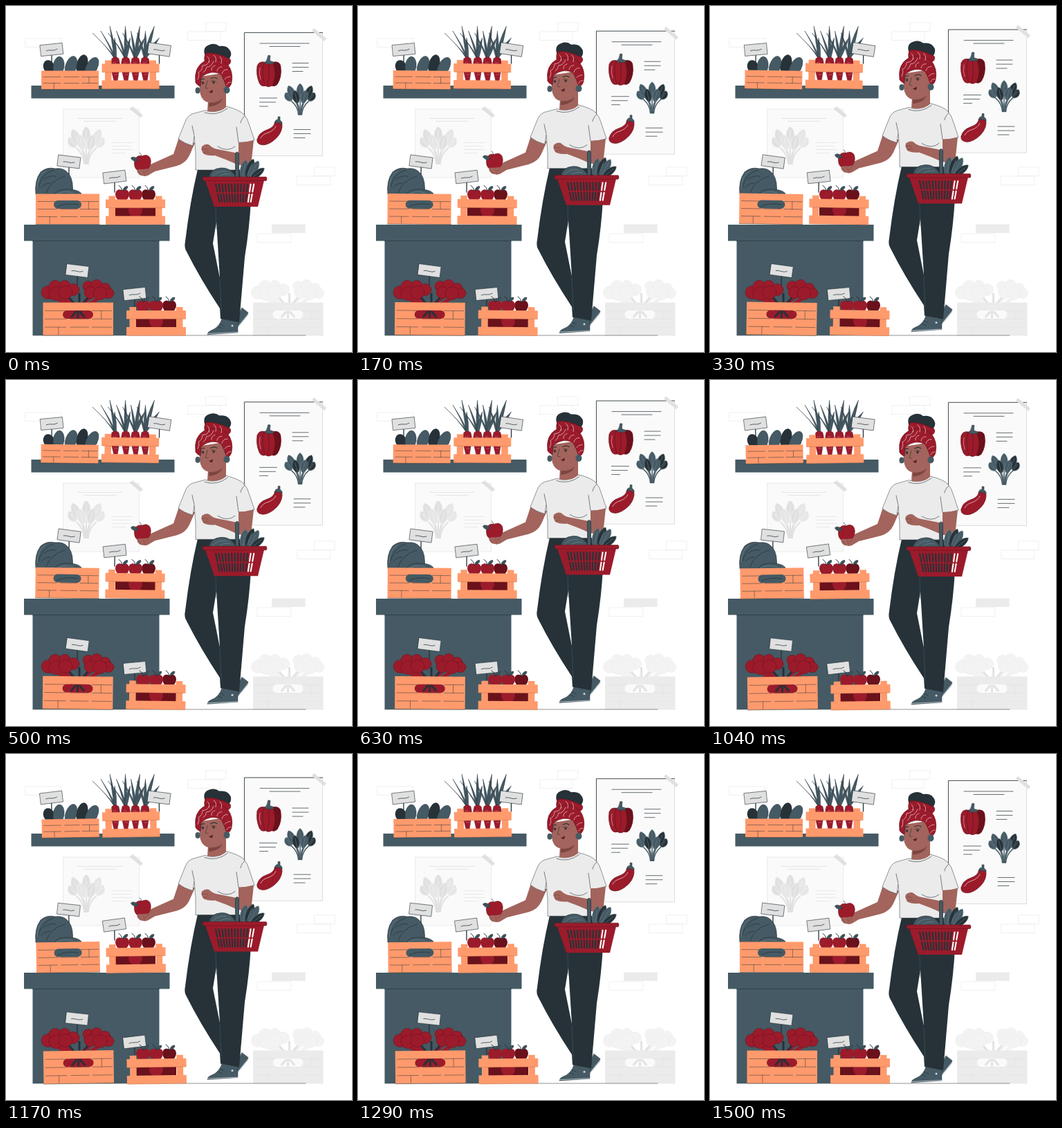
An HTML page for the animation above (1.54 s loop, 500 by 500 pixels).

```html
<!DOCTYPE html>
<html lang="en">
<head>
<meta charset="utf-8">
<title>Vegetable stall</title>
<style>
  html, body { margin: 0; height: 100%; overflow: hidden; background: #fff; }
  svg { display: block; width: 100%; height: 100%; stroke-linecap: round; stroke-linejoin: round; }
</style>
</head>
<body>
<svg id="stage" viewBox="0 0 500 500"></svg>
<script>
const DARK = '#263238', TEAL = '#455a64', RED = '#9b1b2b', WINE = '#6a111b',
      ORANGE = '#ff9a6c', SKIN = '#a2645c', SHADE = '#7d4640', PALE = '#ebebeb', SIGN = '#e0e0e0',
      PAPER = '#fafafa', MIST = '#71868f';

// Shape helpers
const path = (d, fill, stroke = 'none', w = .7) =>
  `<path d="${d}" fill="${fill}" stroke="${stroke}" stroke-width="${w}"/>`;
const line = (d, stroke = DARK, w = .7) => path(d, 'none', stroke, w);
const rect = (x, y, w, h, fill, stroke, sw) => path(`M${x} ${y}h${w}v${h}h${-w}z`, fill, stroke, sw);
const pill = (x, y, w, h, fill) => `<rect x="${x}" y="${y}" width="${w}" height="${h}" rx="${h / 2}" fill="${fill}"/>`;
const oval = (x, y, rx, ry, fill, turn = 0, stroke = 'none') =>
  `<ellipse cx="${x}" cy="${y}" rx="${rx}" ry="${ry}" fill="${fill}" stroke="${stroke}" stroke-width=".5" transform="rotate(${turn} ${x} ${y})"/>`;
const at = (x, y, body, extra = '') => `<g transform="translate(${x} ${y}) ${extra}">${body}</g>`;
const sway = (x, y, body) => `<g class="sway" data-pivot="${x} ${y}">${body}</g>`;
const lines = (x, y, step, widths, color) =>
  widths.map((w, i) => line(`M${x} ${y + i * step}h${w}`, color)).join('');

const leaf = (x, y, len, w, turn, fill, vein) => at(x, y,
  path(`M0 0C${-w} ${-len * .3} ${-w * .8} ${-len * .85} 0 ${-len}C${w * .8} ${-len * .85} ${w} ${-len * .3} 0 0`, fill, vein, .5) +
  line(`M0 0V${-len * .8}`, vein, .5), `rotate(${turn})`);

const bunch = (x, y, scale, fills, vein) => at(x, y,
  [[-36, 23, 15], [36, 23, 15], [-23, 22, 23], [23, 22, 23], [0, 21, 24], [-14, 16, 20], [14, 16, 20]].map(([turn, stem, len], i) => {
    const a = turn * .9 * Math.PI / 180, sx = Math.sin(a) * stem, sy = -Math.cos(a) * stem;
    return line(`M${sx * .2} 0Q${sx * .25} ${sy * .6} ${sx} ${sy}`, fills[0], 1.5) +
      leaf(sx, sy, len, 7.5, turn, fills[i % fills.length], vein);
  }).join(''), `scale(${scale})`);

// Stall pieces
const sign = (x, y, turn, stick) => sway(x, y + stick,
  line(`M${x} ${y + 6}V${y + stick}`, DARK, 1.3) +
  at(x, y, rect(-16, -8, 32, 16, SIGN, DARK, .6) + line('M-8 1q4 -1 8 0t8 -1'), `rotate(${turn})`));

const swayCrate = (x, y, w, h, body) => sway(x + w / 2 + 20, y + h / 2 - 45, body);

const plankCrate = (x, y, w, h, rows = 4, fill = ORANGE, ink = DARK) => {
  const step = h / rows;
  let s = rect(x, y, w, h, fill);
  for (let i = 1; i < rows; i++)
    s += line(`M${x + 3} ${y + step * i}h${w * .3}m${w * .06} 0h${w * .26}m${w * .05} 0h${w * .28}`, ink, .5);
  return s + line(`M${x + w * .83} ${y + step}v${step}M${x + w * .22} ${y + step * (rows - 1)}v${step * .9}M${x} ${y + h}h${w}`, ink, .5);
};

const slatCrate = (x, y, w) => swayCrate(x, y, w, 37,
  rect(x + 4.5, y - 5, 9.5, 41, ORANGE) + rect(x + w - 14, y - 5, 9.5, 41, ORANGE) +
  [0, 24].map(dy => rect(x, y + dy, w, 12.3, ORANGE) +
    line(`M${x + 1} ${y + dy + 12.3}h${w - 2}`, '#b3674a', .4)).join(''));

const apple = (x, y, fill, top = true) =>
  path(`M${x} ${y - 7}c4 -3 10 -1 10 6c-1 7 -6 11 -10 9c-4 2 -9 -2 -10 -9c0 -7 6 -9 10 -6z`, fill) +
  (top ? line(`M${x} ${y - 6}q-1 -6 -5 -8`, DARK, 1) + leaf(x + 1, y - 7, 9, 3, 50, TEAL, DARK) : '');

const appleCrate = (x, y) =>
  rect(x + 14, y + 4, 58, 22, WINE) +
  [[62, WINE], [43, RED], [24, RED]].map(([dx, c]) => apple(x + dx, y - 6, c)).join('') +
  [[24, WINE], [62, WINE], [43, RED]].map(([dx, c]) => apple(x + dx, y + 17, c, false)).join('') +
  slatCrate(x, y, 86);

const florets = [[61, 414, 10], [71, 405, 9], [85, 404, 8], [97, 410, 9], [72, 416, 10], [86, 414, 10],
                 [119, 405, 8], [131, 403, 8], [143, 408, 8], [148, 415, 8], [122, 414, 9], [136, 415, 10]];
const floretCrate = ({ fill, stem, edge, wood, ink, hole, wrap }) =>
  line('M82 420l16 14M72 420l18 14M124 418l-16 16M136 420l-18 14', fill, 6) +
  line('M90 420l12 14M121 418l-13 16M106 416v16', stem, 3) +
  florets.map(([x, y, r]) => oval(x, y, r, r * .95, fill, 0, edge)).join('') +
  wrap(plankCrate(53.5, 428.5, 101.5, 47.5, 4, wood, ink) + pill(82, 440, 44, 12, hole) +
    line('M95 449l6 -7M104 450v-8M113 449l-6 -7', stem, 3));

const radish = x =>
  [[-23, 37], [-11, 40], [2, 47], [9, 30]].map(([spread, h]) => {
    const dx = spread + (x - 178) * .5;
    return path(`M${x - 1.5} 76Q${x + dx * .3 - 3} ${76 - h * .5} ${x + dx} ${76 - h}Q${x + dx * .5 + 3} ${76 - h * .5} ${x + 1.5} 76z`, TEAL, DARK, .4);
  }).join('') +
  path(`M${x - 5} 76q5 -5 10 0q3 9 0 20l-2 13h-5l-3 -13q-3 -11 0 -20z`, RED, WINE, .4) +
  line(`M${x - 3} 82h4M${x - 1} 99h4`, '#d58a90', .5);

const brick = (x, y, w) => rect(x, y, w, 12.5, 'none', '#e6e6e6', .6);

const backdrop =
  [[28, 47, 52], [289, 24, 29], [263, 37, 47], [446, 233, 29], [421, 246, 48], [363.5, 329, 48.5]].map(b => brick(...b)).join('') +
  rect(384, 315.5, 48.5, 12.5, PALE) +
  rect(83, 149, 109.5, 99, PAPER, PALE, 1) +
  lines(104, 162.5, 0, [64], '#dcdcdc') + lines(113, 166.5, 0, [46], '#dcdcdc') +
  lines(153, 197.5, 5, [30, 27, 30, 20], '#e2e2e2') +
  bunch(116, 228, 1.2, ['#e0e0e0', '#e6e6e6'], '#f5f5f5') +
  path('M183 145l15 13l-3.5 3.5l-16 -13z', SIGN) +
  at(303.5, 0, floretCrate({ fill: '#f3f3f3', stem: '#e3e3e3', edge: '#ebebeb', wood: PALE, ink: '#dcdcdc', hole: '#fafafa', wrap: s => s })) +
  line('M39 476H433', '#777', .8);

const stall =
  rect(36.5, 115, 207, 18.5, TEAL) +
  rect(38.5, 339, 183, 137, TEAL) + rect(26, 316, 210.5, 23.5, TEAL) + line('M38.5 339.5h183', DARK, .6) +
  sign(66, 63, -6, 22) +
  oval(62, 88, 8, 10, DARK, -20) + oval(76, 87, 8, 14, TEAL, 8, DARK) +
  oval(110, 85, 8, 15, DARK, 14) + oval(94, 87, 8, 15, TEAL, 18, DARK) + oval(124, 88, 8, 15, TEAL, 28, DARK) +
  swayCrate(51, 93, 83, 27, plankCrate(51, 93.5, 83, 27, 3)) +
  [158, 173, 187, 201].map(radish).join('') + sign(221.5, 63, 8, 20) + slatCrate(138.5, 83.5, 83) +
  sign(91, 225, 7, 24) +
  path('M43 272q-2 -20 7 -32q9 -8 21 -5q13 -2 20 8q7 9 5 29z', TEAL, DARK) +
  line('M47 262q4 -20 22 -25M58 270q6 -18 27 -24M72 246q-8 -2 -17 4M64 256q-8 0 -13 6', DARK) +
  line('M45 264q1 -20 12 -25', MIST) +
  path('M68 276q4 -11 17 -11q18 -1 24 6l-5 6z', TEAL, DARK) + line('M73 272q10 -6 24 -2', MIST) +
  swayCrate(43, 271, 92, 44, plankCrate(43, 271.5, 92, 44) + pill(69, 281, 40, 12, TEAL) + line('M74 290q12 -6 30 -3')) +
  sign(157, 247, -7, 22) + appleCrate(144, 279.5) +
  sign(103, 382.5, 7, 23) +
  floretCrate({ fill: RED, stem: DARK, edge: WINE, wood: ORANGE, ink: DARK, hole: RED, wrap: s => swayCrate(53, 428, 102, 48, s) }) +
  sign(186, 416, -6, 18) + appleCrate(174, 440);

const pepper =
  path('M363 86q2 -8 11 -6q6 -3 12 0q10 -2 11 7q2 14 -5 25q-4 4 -8 2q-5 3 -9 0q-6 2 -9 -4q-5 -12 -3 -24z', RED, WINE) +
  path('M385 80q11 -2 12 7q1 15 -5 25q-4 4 -7 1q7 -16 0 -33z', WINE) +
  line('M373 81q-5 14 1 32M379 82q3 16 -1 32', WINE) + line('M367 88q-2 9 1 17', '#e7a4a8') +
  path('M373 81q4 -2 5 -8q0 -2 1 -3l3 .5q-1 6 0 8q4 0 6 3q-8 3 -15 -.5z', TEAL, DARK, .5);

const poster =
  rect(344.5, 38.5, 113, 178, PAPER, '#c8c8c8', .6) + line('M344.5 216V38.5H457.5', DARK, .8) +
  line('M367 54h71M381 58.5h44') +
  lines(414, 82.5, 6, [23, 23, 15]) + lines(366.5, 133, 6, [25, 23, 12]) + lines(416, 178.5, 6, [24, 24, 16]) +
  at(0, 1.2, pepper) +
  bunch(425, 157, 1, [TEAL, DARK], MIST) +
  path('M363 193q2 -10 14 -14q9 -3 11 -9q1 -5 6 -5q5 2 5 9q-1 12 -13 21q-11 8 -19 5q-5 -2 -4 -7z', RED, WINE) +
  line('M368 191q3 -6 11 -8q8 -3 11 -9', '#e7a4a8', 1) +
  path('M388 169q1 -5 5 -5l0 -4h3l0 5q4 2 3 6q-3 -3 -5 -2q-3 -2 -6 0z', TEAL, DARK, .5) +
  path('M445 32l18 15l-3 4l-18 -15z', SIGN);

let slots = '';
for (let i = 0; i < 13; i++) {
  const x = 303 + i * 4.6, lean = (333 - x) * .1, fill = x > 350 ? '#fff' : DARK;
  slots += line(`M${x} 257.5l${lean * .8} 11M${x + lean} 272l${lean * .8} 11`, fill, 2.1);
}

const legs =
  path('M341 436l9 7l-1 4l-18 22l-6 -4z', TEAL, DARK, .4) + line('M350 445l-16 20', '#cfd8dc', 1) +
  path('M312 452l23 4v16l-44 3q0 -4 5 -6q12 -4 16 -17z', TEAL, DARK, .4) +
  line('M291.5 473.5l43 -2', '#cfd8dc', .8) + line('M306 463l6 3M309 459l6 3') + oval(327, 462, 1.5, 1.5, '#cfd8dc') +
  path('M277 236h60q14 17 17 44q-2 40 -9 83l-8 94l-27 -5l-1 -15q-29 -44 -48 -82q-4 -6 -2 -15q7 -58 18 -104z', DARK) +
  path('M304 312l-5 31l10 50z', '#fff') + line('M303 292l1 30M309 395l2 46', TEAL, .6);

const head =
  path('M305 126l13 -8v28q-9 9 -27 6l1 -16z', SKIN) + path('M293 139.5q14 1 20 -6q-3 10 -20 12z', SHADE) +
  path('M281 102q-3 15 0 26q3 10 12 11.5q10 1 18 -5l7 -16l-2 -22z', SKIN) +
  path('M287 70q-3 -11 7 -14q8 -3 14 2q10 -1 14 4q6 6 1 14l-23 8z', DARK) +
  path('M289 68q14 -2 35 9q3 6 -6 10l-30 -5q-3 -8 1 -14z', RED, WINE) +
  path('M274 110q-3 -22 14 -31q18 -7 32 5q9 11 6 27q-2 7 -7 8q-3 -11 -8 -20q-14 -8 -29 4l-1 13q-6 -2 -7 -6z', RED, WINE) +
  line('M277 106q3 -6 1 -10q6 -3 6 -10q7 0 10 -6M285 96q4 -2 5 -8q6 1 10 -8M297 93q-1 -5 5 -7M305 94q1 -6 7 -6M312 98q2 -7 8 -6M316 106q3 -4 8 -4M319 114q1 -4 6 -4M291 73q4 3 2 8M300 71q5 3 3 10M309 73q4 4 2 10', '#f0d4d4', .7) +
  oval(277, 122, 3.5, 4.5, TEAL) + oval(319, 121.5, 4.5, 5, TEAL) +
  line('M281.5 106.5q2 -2 5 -1M296 105q5 -3 9 0', DARK, 1.2) +
  oval(284.5, 111.5, 1.4, 1.8, DARK) + oval(300, 110.5, 1.5, 1.8, DARK) +
  line('M281.5 109.5q3 -1 5 1M296.5 108.5q4 -2 7 1M291 108q-1 6 -3 10q2 2 4 1', DARK, .6) +
  path('M293 123.5q3 0 5.500 -2.5q1 4 -2 5z', '#4b2027');

const shopper = legs +
  path('M250 190l-8 24l-29 13q-9 4 -14 8l-9 1q-2 4 3 8q6 3 12 1l10 -6l32 -8q13 -4 18 -15l8 -18z', SKIN) +
  path('M196 217q8 -4 12 2q3 7 -1 14q-5 7 -11 5q-8 1 -10 -6q-2 -9 2 -13q4 -4 8 -2z', RED, WINE, .5) +
  line('M196 218q0 -4 -3 -6') + leaf(191, 223, 11, 4, -72, TEAL, DARK) +
  path('M189 237q4 -2 8 -1l9 -1q8 0 8 4l-9 5q-3 3 -6 1l-5 -1z', SKIN) + line('M192 239l3 6M199 238l1 6M206 236l-4 5', SHADE, .6) +
  path('M288 151q15 6 30 -6q20 5 26 12q5 5 8 16l7 21q-10 4 -22 4l-1 39h-62q1 -23 -2 -49l-2 14q-12 -3 -21 -10l10 -25q3 -8 10 -11z', PALE, DARK, .5) +
  line('M287 154q17 6 33 -6M339 169q1 -6 6 -10M336 197l-3 -22M272 187l-3 -14M306 203q14 9 25 0', DARK, .6) +
  // Basket contents, arm and basket
  path('M293 249q2 -14 18 -15q14 -1 22 14z', TEAL, DARK) + line('M298 247q7 -10 20 -8M308 247q5 -6 16 -4', MIST) +
  path('M336 197q11 0 22 -3l-3 28q-1 9 -9 10l-12 -3q-15 -7 -32 -13q-9 1 -16 -2q-5 -6 -3 -11q6 -5 11 -2q5 5 12 6l30 6z', SKIN) +
  line('M283 207q5 -2 9 1M285 212q5 -2 8 0', SHADE, .7) +
  leaf(341, 250, 28, 8, 12, TEAL, MIST) + leaf(346, 250, 31, 8, 22, DARK, MIST) +
  leaf(350, 250, 30, 8, 30, TEAL, MIST) + leaf(352, 251, 27, 7, 52, DARK, MIST) +
  path('M331.5 250v-37q2.5 -4 5 0v37z', TEAL, DARK) +
  path('M288 252h85l-9 38h-63z', RED) + slots +
  path('M285 247h91q2 3 0 5.500h-91q-2 -3 0 -5.500z', RED, WINE, .6) +
  head;

const stage = document.getElementById('stage');
stage.innerHTML = backdrop + `<g class="float">${poster}</g>` + stall + `<g class="float">${shopper}</g>`;
const floaters = stage.querySelectorAll('.float'), swayers = stage.querySelectorAll('.sway');

const LOOP = 1540, CYCLE = 1500;

function draw(now) {
  const u = Math.min(now % LOOP, CYCLE) / CYCLE;
  const lift = 10 * (Math.abs(2 * u - 1) - 1);
  const angle = u < .25 ? 4 * u : u < .75 ? 2 - 4 * u : 4 * u - 4;
  floaters.forEach(g => g.setAttribute('transform', `translate(0 ${lift})`));
  swayers.forEach(g => g.setAttribute('transform', `rotate(${angle} ${g.dataset.pivot})`));
  requestAnimationFrame(draw);
}
draw(0);
</script>
</body>
</html>
```
